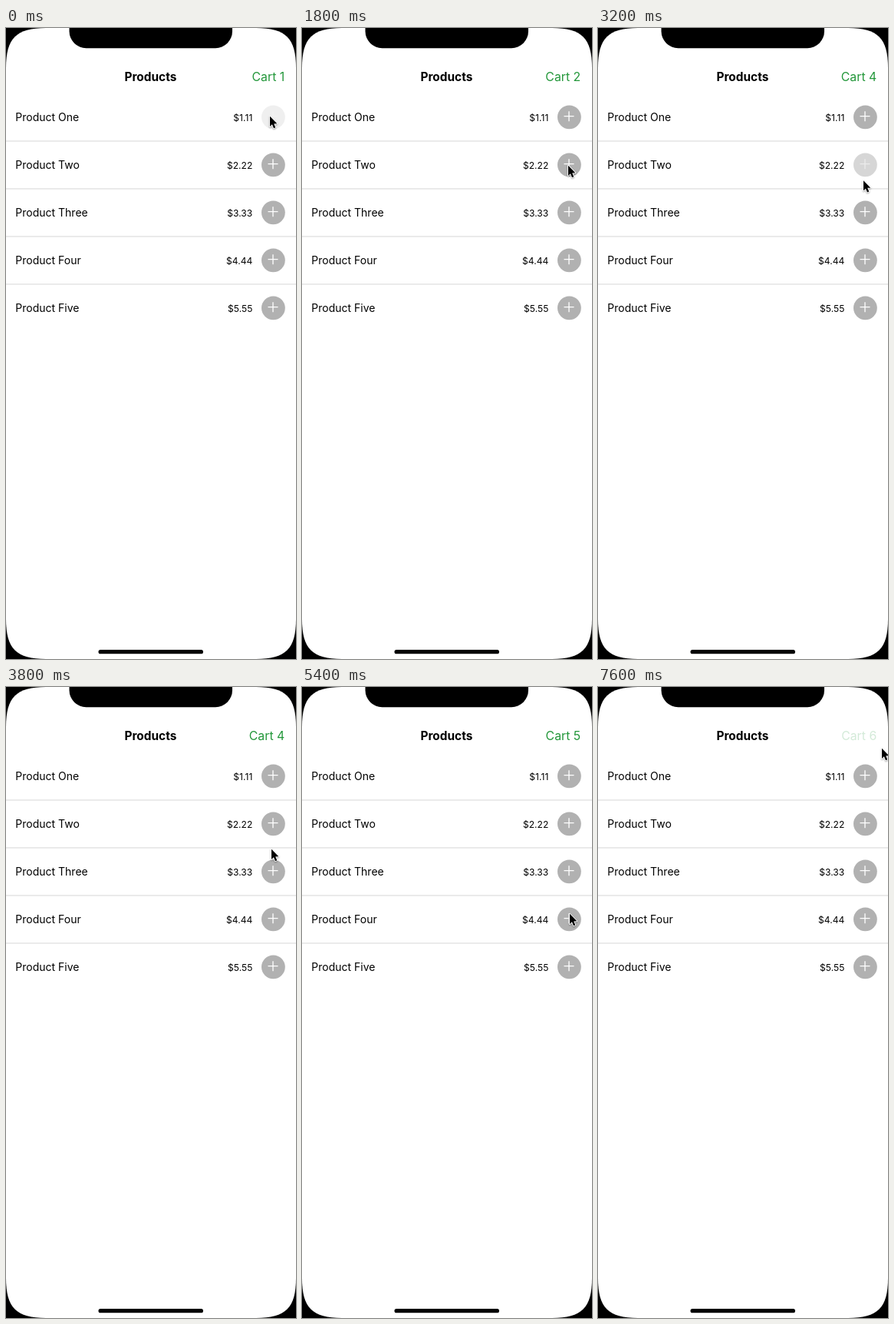
Recreate the animation shown at these times as an HTML page with a canvas. Size 378x820 px, loop 8000 ms.

```html
<!DOCTYPE html>
<html lang="en">
<head>
<meta charset="utf-8">
<title>Products</title>
<style>
  html, body { margin: 0; width: 100%; height: 100%; overflow: hidden; background: #000; }
  canvas { display: block; width: 378px; height: 820px; }
</style>
</head>
<body>
<canvas id="stage"></canvas>
<script>
const W = 378, H = 820, LOOP = 8000, STEP = 200;
const canvas = document.getElementById('stage');
const ctx = canvas.getContext('2d');
const dpr = window.devicePixelRatio || 1;
canvas.width = W * dpr;
canvas.height = H * dpr;

const FONT = 'Inter, Roboto, sans-serif';
const rows = ['One', 'Two', 'Three', 'Four', 'Five'];
const CART = rows.length;
const rowY = i => 116 + 62 * i;

// Pointer stops; a stop with a tap presses that row's button or the cart
const stops = [
  { t: 0, x: 344, y: 114, tap: 0 },
  { t: 2000, x: 347, y: 178, tap: 1 },
  { t: 2400, x: 347, y: 213 },
  { t: 3000, x: 346, y: 180, tap: 1 },
  { t: 3800, x: 346, y: 210 },
  { t: 4200, x: 347, y: 242, tap: 2 },
  { t: 4800, x: 348, y: 253 },
  { t: 5400, x: 349, y: 294 },
  { t: 5800, x: 349, y: 294, tap: 3 },
  { t: 6400, x: 356, y: 67 },
  { t: 6800, x: 367, y: 78 },
  { t: 7200, x: 367, y: 78 },
  { t: 7600, x: 370, y: 79, tap: CART }
];
const END = stops[stops.length - 1].t;
const RELEASE = 100;

const clamp = v => Math.min(1, Math.max(0, v));
const easeOut = k => 1 - (1 - k) ** 3;

function pointerAt(t) {
  const i = stops.findIndex(s => s.t >= t);
  const b = stops[i], a = stops[i - 1] || b;
  const k = easeOut((t - a.t) / (b.t - a.t || 1));
  return [a.x + (b.x - a.x) * k, a.y + (b.y - a.y) * k];
}

// Opacity drops to 0.2 on touch and recovers after release
function alphaOf(target, t) {
  const alphas = stops.filter(s => s.tap === target).map(s => {
    const dt = t - s.t;
    return dt < RELEASE ? 0.2 + 0.8 * clamp(-dt / 150)
                        : 0.2 + 0.8 * clamp((dt - RELEASE) / 250);
  });
  return Math.min(1, ...alphas);
}

const cartCount = t =>
  1 + stops.filter(s => s.tap < CART && t >= s.t + RELEASE).length;

function text(str, x, y, size, weight, align, color = '#000') {
  ctx.font = `${weight} ${size}px ${FONT}`;
  ctx.textAlign = align;
  ctx.fillStyle = color;
  ctx.fillText(str, x, y);
}

// White screen with smooth, continuous corners
function drawScreen() {
  const e = 52, c = e * 0.256;
  ctx.fillStyle = '#000';
  ctx.fillRect(0, 0, W, H);
  ctx.fillStyle = '#fff';
  ctx.beginPath();
  ctx.moveTo(e, 0);
  ctx.lineTo(W - e, 0);
  ctx.bezierCurveTo(W - c, 0, W, c, W, e);
  ctx.lineTo(W, H - e);
  ctx.bezierCurveTo(W, H - c, W - c, H, W - e, H);
  ctx.lineTo(e, H);
  ctx.bezierCurveTo(c, H, 0, H - c, 0, H - e);
  ctx.lineTo(0, e);
  ctx.bezierCurveTo(0, c, c, 0, e, 0);
  ctx.fill();
}

function pill(x, y, w, h, radii) {
  ctx.fillStyle = '#000';
  ctx.beginPath();
  ctx.roundRect(x, y, w, h, radii);
  ctx.fill();
}

function drawButton(x, y, alpha) {
  const px = x - 0.4, py = y - 1.3, arm = 6.5;
  ctx.globalAlpha = alpha;
  ctx.fillStyle = '#b1b1b1';
  ctx.beginPath();
  ctx.arc(x, y - 0.2, 15.4, 0, Math.PI * 2);
  ctx.fill();
  ctx.strokeStyle = '#fff';
  ctx.lineWidth = 1.3;
  ctx.beginPath();
  ctx.moveTo(px - arm, py);
  ctx.lineTo(px + arm, py);
  ctx.moveTo(px, py - arm);
  ctx.lineTo(px, py + arm);
  ctx.stroke();
  ctx.globalAlpha = 1;
}

function drawRow(name, i, t) {
  const y = rowY(i);
  text('Product ' + name, 12.3, y + 5, 14, 400, 'left');
  text('$' + (1.11 * (i + 1)).toFixed(2), 321.3, y + 4.5, 12.1, 400, 'right');
  drawButton(348.4, y, alphaOf(i, t));
  if (i < rows.length - 1) {
    ctx.fillStyle = '#e4e4e4';
    ctx.fillRect(0, y + 30.2, W, 1.5);
  }
}

function drawPointer(x, y) {
  ctx.save();
  ctx.translate(x, y + 0.8);
  ctx.lineJoin = 'round';
  ctx.lineWidth = 1.8;
  ctx.strokeStyle = '#fff';
  ctx.fillStyle = '#000';
  ctx.shadowColor = 'rgba(0,0,0,0.35)';
  ctx.shadowBlur = 2 * dpr;
  ctx.shadowOffsetY = dpr;
  const arrow = new Path2D('M0 0V13.2L2.9 10.5L5 15.4L7.3 14.4L5.2 9.7L9.3 9.5Z');
  ctx.stroke(arrow);
  ctx.shadowColor = 'transparent';
  ctx.fill(arrow);
  ctx.restore();
}

function draw(t) {
  ctx.setTransform(dpr, 0, 0, dpr, 0, 0);
  drawScreen();
  pill(82.5, -1, 212.5, 27.2, [0, 0, 22, 22]);
  pill(120.5, 808, 136.5, 5.3, 2.6);

  text('Products', 188.4, 69, 15.4, 700, 'center');
  ctx.globalAlpha = alphaOf(CART, t);
  text('Cart ' + cartCount(t), 363.2, 69, 15.8, 400, 'right', '#23973a');
  ctx.globalAlpha = 1;

  rows.forEach((name, i) => drawRow(name, i, t));
  drawPointer(...pointerAt(t));
}

function tick() {
  const t = performance.now() % LOOP;
  draw(Math.min(END, Math.floor(t / STEP) * STEP));
  requestAnimationFrame(tick);
}
tick();
</script>
</body>
</html>
```
